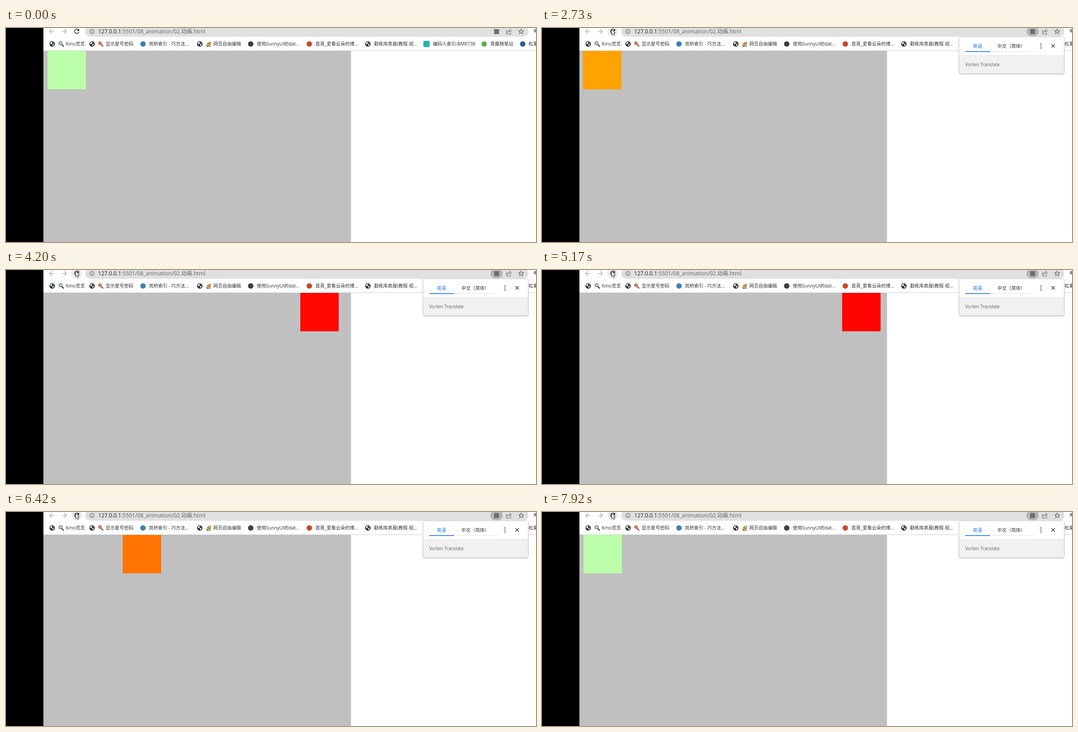
These frames come from a looping animation (1176x476 px, 7990 ms). An HTML page:

```html
<!DOCTYPE html>
<html lang="zh">
<head>
<meta charset="utf-8">
<style>
html, body { margin: 0; width: 100%; height: 100%; overflow: hidden; background: #fff; }
svg { display: block; width: 1176px; height: 476px; }
text { font: 10.25px "Open Sans", "Noto Sans CJK SC", "Noto Sans CJK", sans-serif; fill: #303134; white-space: pre; }
.line { fill: none; stroke: #5f6368; stroke-width: 1.2; }
</style>
</head>
<body>
<svg viewBox="0 0 1176 476">
  <defs>
    <g id="globe">
      <circle r="6" fill="#2b2d30"/>
      <path d="M-4-3L-1-4.5L1-3L-1-1L-2 1L-4 0ZM0 1L3 0L4 2L1 4.5ZM2-4L4-2L3-1Z" fill="#fff"/>
    </g>
    <filter id="shadow" x="-10%" y="-20%" width="120%" height="150%">
      <feDropShadow dx="0" dy="1" stdDeviation="1.3" flood-opacity=".4"/>
    </filter>
  </defs>

  <!-- Page -->
  <path d="M83 51H765.5V476H83Z" fill="#c0c0c0"/>
  <rect id="box" y="51" width="85.3" height="85.3"/>
  <path d="M83 0H1176V50H83Z" fill="#fff"/>
  <path d="M83 50.5H1176" stroke="#cfcfcf"/>
  <path d="M0 0H83V476H0Z"/>

  <!-- Toolbar -->
  <path class="line" d="M107.5 7.5H97.5M102 2.5L97 7.5L102 12.5M123.5 7.5H133.5M129 2.5L134 7.5L129 12.5" style="stroke:#a2a4a7"/>
  <circle id="halo" cx="157" cy="7.5" r="12"/>
  <g id="reload">
    <path class="line" d="M161 4.4A4.8 4.8 0 1 0 161.7 8.8" style="stroke:#202124;stroke-width:1.5"/>
    <path d="M162.3 1.8V6.7H157.4Z" fill="#202124"/>
  </g>
  <path id="stop" class="line" d="M153 3.5L161 11.5M161 3.5L153 11.5" style="stroke:#202124;stroke-width:1.5"/>
  <rect x="175.5" y="-5" width="983.5" height="24.5" rx="12.2" fill="#e0e0e0"/>
  <circle class="line" cx="190.5" cy="7.8" r="4.7"/>
  <path class="line" d="M190.5 7V10.6M190.5 4.8V6"/>
  <text x="204.5" y="12.2" style="font-size:12.1px;fill:#5f6368"><tspan fill="#202124">127.0.0.1</tspan>:5501/08_animation/02.动画.html</text>
  <rect id="pill" x="1075" y="-3" width="27" height="21.5" rx="10.7" fill="#b5b5b5"/>
  <rect x="1083" y="2.5" width="11" height="11" rx="1" fill="#6c6f73"/>
  <path class="line" d="M1112 5H1110.500V13.500H1120V11M1112.500 10C1113 6.500 1115 5.500 1118 5.500V2.500L1122 6.200L1118 9.500V7.500C1115.500 7.500 1114 8 1112.500 10Z" style="stroke-width:1"/>
  <path id="star" class="line"/>
  <circle cx="1175" cy="6" r="4" fill="#8d9093"/>

  <!-- Bookmarks -->
  <g id="bookmarks"></g>
  <g stroke="#333" fill="#a9dcf5">
    <path d="M124 37L128 41" stroke-width="2.4"/>
    <circle cx="121" cy="34" r="3.700"/>
  </g>
  <g stroke="#b5431c" fill="none">
    <path d="M210 35L216 41M213.500 38.500L212 40" stroke-width="2"/>
    <circle cx="208.500" cy="33.500" r="2.500" stroke-width="2.200"/>
  </g>
  <path d="M445 38L448 34L452 31L455 32L453 35L455 37L450 39L446 41Z" fill="#f5b53b" stroke="#4b3520" stroke-width=".8"/>
  <path d="M447 33L452 38M445 41H455" stroke="#333"/>
  <rect x="926" y="28.500" width="14" height="14" rx="3" fill="#28b3b0"/>

  <!-- Translation bubble -->
  <g id="bubble">
    <rect x="925.500" y="20" width="233" height="81" rx="3" fill="#fff" stroke="#c4c4c4" stroke-width=".6" filter="url(#shadow)"/>
    <path d="M926 61H1158V98Q1158 100.700 1155 100.700H929Q926 100.700 926 98Z" fill="#f1f1f1"/>
    <path d="M926 61.500H1158M994 52.500H1090" stroke="#dedede"/>
    <path d="M939 52.300H994" stroke="#1a73e8" stroke-width="1.700"/>
    <text x="956" y="43.700" style="fill:#1a73e8;font-weight:500">英语</text>
    <text x="1010.500" y="43.700" style="font-weight:500">中文（简体）</text>
    <g fill="#4a4d51">
      <circle cx="1107" cy="35.500" r="1.300"/><circle cx="1107" cy="40" r="1.300"/><circle cx="1107" cy="44.500" r="1.300"/>
    </g>
    <path class="line" d="M1130.500 36L1138 43.500M1138 36L1130.500 43.500" style="stroke:#3c4043;stroke-width:1.500"/>
    <text x="939" y="85.300" style="font-size:10.200px;fill:#5f6368"><tspan font-weight="500">Vorlen</tspan> Translate</text>
  </g>

  <path id="cursor" d="M0 0V11.500L2.700 9L4.600 13.200L6.600 12.300L4.700 8.200H8.300Z" fill="#fff" stroke="#222" stroke-width=".9"/>
</svg>

<script>
const $ = id => document.getElementById(id);
const LOOP = 7990, FRAME = 69.8, MOVE_START = 2730;
const clamp = v => Math.max(0, Math.min(1, v));
const mix = (a, b, u) => a + (b - a) * u;
const smooth = u => u * u * (3 - 2 * u);
const within = (t, a, b) => t >= a && t < b;

$("star").setAttribute("d", "M" + Array.from({ length: 10 }, (_, i) => {
  const r = i % 2 ? 2.6 : 5.8, a = i * Math.PI / 5;
  return `${1143 + r * Math.sin(a)} ${8 - r * Math.cos(a)}`;
}).join("L") + "Z");

// Label x, label, icon x, icon colour
const bookmarks = [
  [132.5, "Kmo觅觅"], [221, "显示星号密码"],
  [317, "岚桥索引 - 巧方法...", 304, "#397fb8"],
  [460, "网页自由编辑"],
  [556.5, "使用SunnyUI的dat...", 543, "#3c3c3c"],
  [686.5, "首頁_爱看云朵的博...", 673, "#c8481f"],
  [816.5, "勤练库表屋(教程 视..."],
  [947, "编码人索引-BMR738"],
  [1074.5, "青藤随笔站", 1061, "#62ab4b"],
  [1159.5, "松果集", 1146.5, "#275f8f"]
];
$("bookmarks").innerHTML = bookmarks.map(([x, label, iconX, color]) =>
  `<text x="${x}" y="39.3">${label}</text>` +
  (color ? `<circle cx="${iconX}" cy="35.5" r="6" fill="${color}"/>` : "")
).join("") + [102.5, 191, 430, 803].map(x => `<use href="#globe" x="${x}" y="35.5"/>`).join("");

// CSS "ease": cubic-bezier(.25, .1, .25, 1)
function ease(x) {
  const curve = (a, b, s) => 3 * a * s * (1 - s) ** 2 + 3 * b * s * s * (1 - s) + s ** 3;
  let lo = 0, hi = 1;
  for (let i = 0; i < 24; i++) {
    const mid = (lo + hi) / 2;
    if (curve(.25, .25, mid) < x) lo = mid; else hi = mid;
  }
  return curve(.1, 1, lo);
}

function drawBox(t) {
  const n = Math.floor((t - MOVE_START) / FRAME + .3);
  let x = 92, color = "#bbffaa";
  if (t >= MOVE_START && n < 60) {
    const phase = (n ? n + 1 : .77) / 30; // 30 ticks each way, the first one early
    const p = ease(phase < 1 ? phase : 2 - phase);
    x = 83.2 + 597 * p;
    color = `rgb(255, ${Math.round(165 * (1 - p))}, 0)`;
  }
  $("box").setAttribute("x", Math.round(x));
  $("box").setAttribute("fill", color);
}

function drawCursor(t) {
  const u = clamp((t - 330) / 770);
  const first = smooth(clamp(u / .75)), second = smooth(clamp((u - .75) / .25));
  const x = mix(mix(1104, 99, first), 154.5, second);
  const y = mix(mix(424, 5, first), 3.5, second);
  $("cursor").setAttribute("transform", `translate(${x} ${y})`);
  $("cursor").style.display = t < 330 ? "none" : "";
}

function draw(t) {
  drawBox(t);
  drawCursor(t);
  const pressed = within(t, 1380, 1520) || within(t, 7360, 7500);
  const loading = within(t, 1520, 1660) || within(t, 7500, 7640);
  $("halo").setAttribute("fill", t < 1100 ? "none" : pressed ? "#d2d2d2" : "#ececec");
  $("reload").style.display = loading ? "none" : "";
  $("stop").style.display = loading ? "" : "none";
  const shown = t < 7430 ? clamp((t - 1680) / 250) : clamp((t - 7710) / 210);
  $("bubble").style.opacity = $("pill").style.opacity = shown;
}

const start = performance.now();
function tick() {
  draw((performance.now() - start) % LOOP);
  requestAnimationFrame(tick);
}
tick();
</script>
</body>
</html>
```
